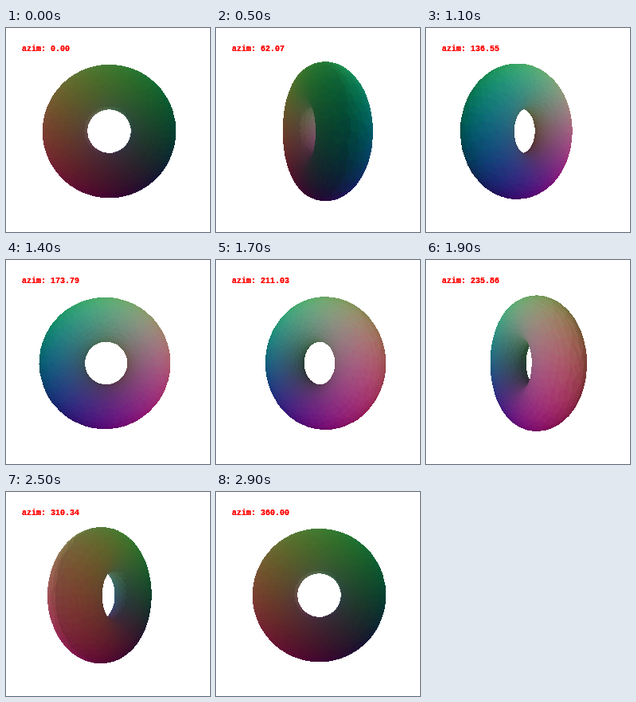
An HTML page with a canvas that plays this animation: 256 px wide and 256 px high, repeating every 3 s.

```html
<!DOCTYPE html>
<html lang="en">
<head>
<meta charset="utf-8">
<title>Rotating torus</title>
<style>
  html, body { margin: 0; width: 100%; height: 100%; overflow: hidden; background: #fff; }
  canvas { display: block; width: 256px; height: 256px; image-rendering: pixelated; }
</style>
</head>
<body>
<canvas id="stage" width="256" height="256"></canvas>
<script>
const SIZE = 256, CENTER = SIZE / 2;
const FOCAL = 217, DISTANCE = 4;
const MAJOR = 1, MINOR = 0.5, RINGS = 60, SIDES = 30;
const OFFSET = 0.0275; // the torus sits slightly off the turning axis
const STEPS = 30, STEP_MS = 100;

const ctx = document.getElementById('stage').getContext('2d');
const image = ctx.createImageData(SIZE, SIZE);
const pixels = new Uint32Array(image.data.buffer);
const depths = new Float32Array(SIZE * SIZE);

let seed = 7;
function random() {
  seed = (seed * 16807) % 2147483647;
  return seed / 2147483647;
}
const jitter = () => (random() - 0.5) * 0.7;

const sub = (a, b) => a.map((v, i) => v - b[i]);
const dot = (a, b) => a[0] * b[0] + a[1] * b[1] + a[2] * b[2];
const cross = (a, b) => [
  a[1] * b[2] - a[2] * b[1],
  a[2] * b[0] - a[0] * b[2],
  a[0] * b[1] - a[1] * b[0]
];
const unit = a => a.map(v => v / Math.hypot(...a));
const LIGHT = unit([0.12, -0.1, -1]);

// Colour follows position; light adds a soft diffuse term to the ambient half.
function shade(corners) {
  const [a, b, c] = corners;
  const mid = a.map((v, i) => (v + b[i] + c[i]) / 3);
  const radius = Math.hypot(mid[0], mid[1]);
  const core = [mid[0] / radius * MAJOR, mid[1] / radius * MAJOR, 0];
  const normal = unit(cross(sub(b, a), sub(c, a)));
  const facing = Math.sign(dot(normal, sub(mid, core)));
  const lit = Math.max(0, (facing * dot(normal, LIGHT) + 0.35) / 1.35);
  const level = 0.5 + 0.25 * lit ** 0.6;
  const [r, g, bl] = [-mid[0], mid[1], -mid[2]].map(v =>
    Math.round(255 * Math.min(1, Math.max(0, (0.5 + v / 3) * level))));
  return (255 << 24 | bl << 16 | g << 8 | r) >>> 0;
}

const vertices = [];
for (let i = 0; i < RINGS; i++) {
  for (let j = 0; j < SIDES; j++) {
    const u = (i + jitter()) / RINGS * 2 * Math.PI;
    const v = (j + jitter()) / SIDES * 2 * Math.PI;
    const radius = MAJOR + MINOR * Math.cos(v);
    vertices.push([radius * Math.cos(u), radius * Math.sin(u), MINOR * Math.sin(v)]);
  }
}

const triangles = [];
function addTriangle(...ids) {
  triangles.push({ ids, color: shade(ids.map(id => vertices[id])) });
}
for (let i = 0; i < RINGS; i++) {
  for (let j = 0; j < SIDES; j++) {
    const at = (di, dj) => (i + di) % RINGS * SIDES + (j + dj) % SIDES;
    addTriangle(at(0, 0), at(1, 0), at(1, 1));
    addTriangle(at(0, 0), at(1, 1), at(0, 1));
  }
}

function fillTriangle([a, b, c], color) {
  const area = (b.x - a.x) * (c.y - a.y) - (b.y - a.y) * (c.x - a.x);
  if (Math.abs(area) < 1e-9) return;
  const left = Math.ceil(Math.min(a.x, b.x, c.x) - 0.5);
  const right = Math.floor(Math.max(a.x, b.x, c.x) - 0.5);
  const top = Math.ceil(Math.min(a.y, b.y, c.y) - 0.5);
  const bottom = Math.floor(Math.max(a.y, b.y, c.y) - 0.5);
  for (let row = top; row <= bottom; row++) {
    for (let col = left; col <= right; col++) {
      const x = col + 0.5, y = row + 0.5;
      const wb = ((x - a.x) * (c.y - a.y) - (y - a.y) * (c.x - a.x)) / area;
      const wc = ((b.x - a.x) * (y - a.y) - (b.y - a.y) * (x - a.x)) / area;
      const wa = 1 - wb - wc;
      if (wa < -1e-6 || wb < -1e-6 || wc < -1e-6) continue;
      const near = wa * a.near + wb * b.near + wc * c.near;
      const index = row * SIZE + col;
      if (near > depths[index]) {
        depths[index] = near;
        pixels[index] = color;
      }
    }
  }
}

function draw(azimuth) {
  const angle = azimuth * Math.PI / 180;
  const sin = Math.sin(angle), cos = Math.cos(angle);
  const points = vertices.map(vertex => {
    const x = vertex[0] + OFFSET, y = vertex[1] - OFFSET, z = vertex[2] + OFFSET;
    const near = 1 / (DISTANCE - x * sin - z * cos);
    return {
      x: CENTER + FOCAL * (x * cos - z * sin) * near,
      y: CENTER - FOCAL * y * near,
      near
    };
  });
  pixels.fill(0xffffffff);
  depths.fill(0);
  for (const { ids, color } of triangles) fillTriangle(ids.map(id => points[id]), color);
  ctx.putImageData(image, 0, 0);

  // Drawn twice to harden the small letters.
  ctx.fillStyle = '#f00';
  ctx.font = 'bold 10px "Liberation Mono", monospace';
  for (let pass = 0; pass < 2; pass++) ctx.fillText('azim: ' + azimuth.toFixed(2), 20, 29);
}

let shown = -1;
function tick() {
  const step = Math.floor(performance.now() / STEP_MS) % STEPS;
  if (step !== shown) {
    shown = step;
    draw(step * 360 / (STEPS - 1));
  }
  requestAnimationFrame(tick);
}
tick();
</script>
</body>
</html>
```
